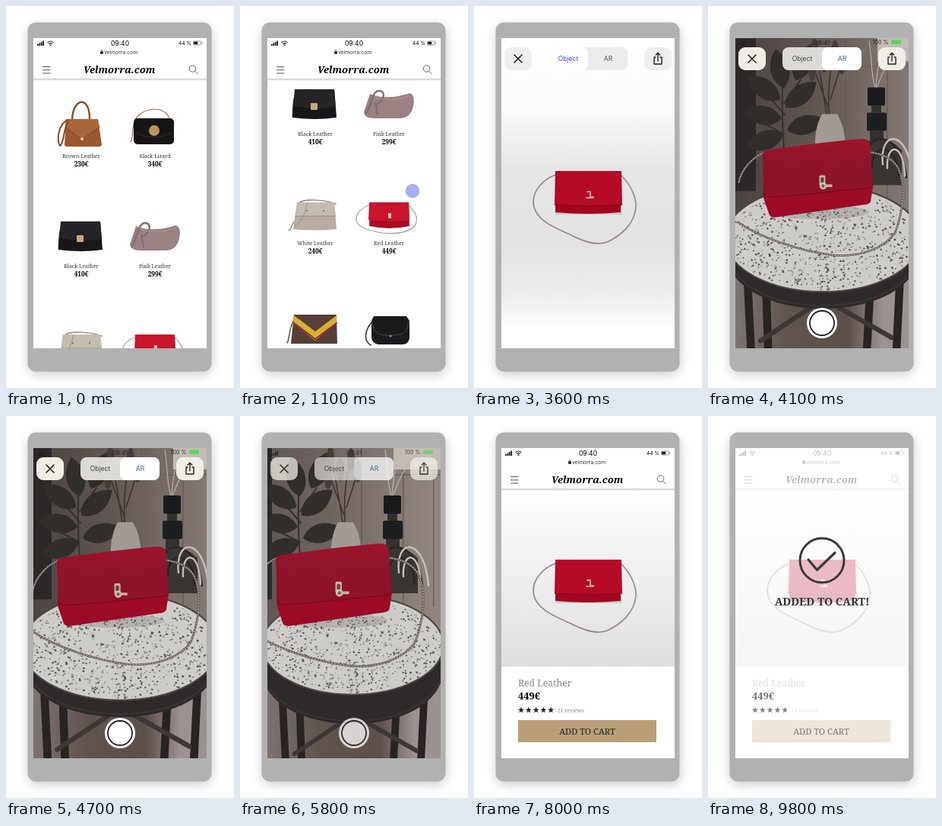
An HTML page that plays this animation: 300x500 px, repeating every 9900 ms.

```html
<!DOCTYPE html>
<html lang="en">
<head>
<meta charset="utf-8">
<title>Bag shop with AR preview</title>
<style>
  html, body { margin: 0; width: 100%; height: 100%; overflow: hidden; background: #fff; }
  svg { display: block; width: 300px; height: 500px; }
  text { font-family: "Noto Serif", serif; }
  .ui { font-family: Inter, "Liberation Sans", sans-serif; }
  .mid { text-anchor: middle; }
  .line { fill: none; stroke-linecap: round; stroke-linejoin: round; }
</style>
</head>
<body>
<svg id="stage" viewBox="0 0 300 500"></svg>
<script>
const LOOP = 9900, STEP = 100, ROW = 143.5, SCROLL = 173;
const stage = document.getElementById('stage');

const text = (x, y, size, str, cls = 'mid', extra = '') =>
  `<text x="${x}" y="${y}" font-size="${size}" class="${cls}" ${extra}>${str}</text>`;
const shape = (d, fill) => `<path d="${d}" fill="${fill}"/>`;
const line = (d, color, width = 1) =>
  `<path class="line" d="${d}" stroke="${color}" stroke-width="${width}"/>`;
const box = (x, y, w, h, fill, r = 0) =>
  `<rect x="${x}" y="${y}" width="${w}" height="${h}" rx="${r}" fill="${fill}"/>`;
const disc = (x, y, r, fill) => `<circle cx="${x}" cy="${y}" r="${r}" fill="${fill}"/>`;
const group = (id, body, extra = '') => `<g id="${id}" ${extra}>${body}</g>`;

function random(seed) {
  return () => (seed = (seed * 16807) % 2147483647) / 2147483647;
}

// ---- shop list ----
const bags = [
  ['Brown Leather', '230€',
    line('M87 149C88 119 111 117 110 149', '#8a4d29', 2.4) +
    shape('M79 148H121L126 181Q126 184 122 184H80Q77 184 77 181Z', '#9b5931') +
    shape('M79 148H121L123 158L100 175L78 158Z', '#a9663b') +
    line('M78 158L100 175L123 158', '#6f3c20', .8) +
    line('M82 149C69 153 66 177 71 183C77 179 75 160 82 152', '#83492a', 2) +
    disc(100, 174, 2, '#e4cfae')],
  ['Black Lizard', '340€',
    line('M169 152C173 134 211 126 216 150M169 152C165 162 168 172 164 178', '#98764c', 1.2) +
    box(168, 147, 53, 34, '#171516', 5) +
    line('M171 166Q195 178 218 166', '#353033', 1) + disc(195, 163, 7, '#b9945c')],
  ['Black Leather', '410€',
    line('M73 301C77 288 82 283 87 283M70 318C70 303 72 287 77 283', '#34312e', 2.5) +
    shape('M72 282H124L127 319Q99 323 69 319Z', '#171719') +
    shape('M72 282H124L126 305Q98 310 72 304Z', '#252528') + box(93, 300, 9, 9, '#c6a878', 1)],
  ['Pink Leather', '299€',
    shape('M171 288Q192 297 224 287Q231 291 228 304Q225 319 211 320H176Q164 320 163 312Z', '#9b8182') +
    line('M166 314C174 300 174 283 184 284C194 286 187 300 178 302M178 300L181 315', '#7f7072', 2.4) +
    line('M176 292Q197 300 222 291', '#b49b9b', .8)],
  ['White Leather', '240€',
    line('M74 453C66 459 68 467 64 466M76 432C83 423 117 428 126 432', '#8f8579', 1.5) +
    shape('M75 430H124L127 465Q99 468 70 465Z', '#b7aea1') +
    shape('M75 430H124L126 448H73Z', '#c4bcae') +
    line('M73 448H126M72 460C82 458 86 441 89 430', '#8f8579', .8) +
    disc(88, 441, 1, '#6b6259') + disc(110, 441, 1, '#6b6259')],
  ['Red Leather', '449€',
    line('M171 433C151 441 146 456 164 464C190 474 221 473 231 459C236 447 226 438 222 434', '#a8a3a0', 1.3) +
    shape('M171 431H222L223 461Q197 467 170 461Z', '#a70f24') +
    shape('M170 430H222L223 453Q197 457 169 453Z', '#c9152d') + box(195, 444, 4, 7, '#d2c6bd', 1)],
  ['Brown Stripe', '380€',
    line('M70 585C64 599 65 610 62 614', '#5b4235', 1.4) +
    shape('M71 577H127L128 615H67Z', '#573e36') +
    shape('M71 578L99 599L127 578V588L99 611L70 588Z', '#d5ae36') +
    line('M71 588L99 609L127 588', '#8c2d2c', 2)],
  ['Black Saddle', '320€',
    line('M174 586C162 600 164 612 172 617', '#2c2c2e', 1.5) +
    shape('M176 579H219L223 585V608Q221 616 214 616H182Q173 614 173 606V585Z', '#1b1b1d') +
    line('M174 585C175 602 182 604 197 604C214 604 221 602 222 585', '#49484b', 1) +
    disc(198, 605, 1.5, '#8f8b87')]
];
const list = bags.map(([name, price, art], i) => {
  const x = i % 2 ? 196 : 99, y = 199 + (i >> 1) * ROW;
  return art + text(x, y, 6.9, name, 'mid', 'fill="#333"') +
    text(x, y + 11, 8.4, price, 'mid', 'font-weight="700"');
}).join('');

// ---- shared parts ----
const signal = color => [0, 1, 2, 3].map(i => box(41 + i * 2.4, 50 - i * 1.5, 1.8, 2 + i * 1.5, color)).join('');
const header = box(36, 42, 228, 54, '#fff') + signal('#222') +
  line('M55 47.5Q58.5 44.5 62 47.5M56.6 49.4Q58.5 47.8 60.4 49.4', '#222', 1.2) + disc(58.5, 51.2, 1, '#222') +
  text(150, 52, 8.6, '09:40', 'ui mid') + text(235.5, 51, 6.6, '44 %', 'ui mid') +
  '<rect x="246.5" y="46" width="10" height="5" rx="1" fill="none" stroke="#777" stroke-width=".7"/>' +
  box(247.2, 46.7, 5, 3.6, '#222') + box(257.3, 47.5, 1, 2, '#777') +
  box(124, 59.5, 4, 3.2, '#222', .6) + line('M125 59.5V58.3Q126 56.8 127 58.3V59.5', '#222', .7) +
  text(151, 62.5, 6.8, 'velmorra.com', 'ui mid', 'fill="#333"') +
  line('M48.5 79.5H58M48.5 83.8H58M48.5 88H58', '#555', 1) +
  text(149, 88, 13, 'Velmorra.com', 'mid', 'font-weight="800" font-style="italic"') +
  '<circle cx="245.5" cy="82" r="4.3" fill="none" stroke="#666"/>' + line('M248.8 85.4L252.4 89', '#666', 1) +
  box(36, 95.3, 228, 1.2, '#b9b9b9') + box(36, 96.5, 228, 1.5, '#eee');

const redBag = line('M107 221C91 227 78 241 78 257C79 279 103 289 126 299C145 309 161 314 175 309C195 300 211 284 213 264C214 249 205 233 194 222', '#968b86', 1.7) +
  box(107, 268, 88, 5, '#777', 2).replace('/>', ' opacity=".25"/>') +
  shape('M107 240H194L193 270Q150 274 107 270Z', '#a30520') +
  shape('M107 216H194L195 260Q151 264 106 260Z', '#b50928') +
  line('M106 260Q151 264 195 260', '#78061b', 1.1) +
  line('M149 243H153V250H157M148 251H157', '#b9a49a', 2.2);

const star = x => {
  let d = '';
  for (let i = 0; i < 10; i++) {
    const a = i * Math.PI / 5, r = i % 2 ? 1.8 : 4.3;
    d += `${i ? 'L' : 'M'}${(x + r * Math.sin(a)).toFixed(1)} ${(385 - r * Math.cos(a)).toFixed(1)}`;
  }
  return shape(d + 'Z', '#222');
};
const product = box(36, 96, 228, 352, '#fff') + box(36, 97, 228, 231, 'url(#studio)') +
  group('', redBag, 'transform="translate(0 -28)"') +
  text(58, 354, 12.2, 'Red Leather', '', 'fill="#888"') +
  text(110, 388, 6.8, '21 reviews', '', 'fill="#888"') + box(58, 398, 182, 29, '#b99f78');
const details = text(58, 371, 13, '449€', '', 'font-weight="700"') +
  [62, 71.8, 81.6, 91.4, 101.2].map(star).join('') +
  text(149, 417, 11.2, 'ADD TO CART', 'mid', 'fill="#222"');

// ---- viewer toolbar ----
const toolbar = ar => {
  const idle = ar ? '#dcdad7' : '#ebebeb', key = ar ? '#efede6' : '#eee';
  return box(40, 54, 36, 30, key, 9) + line('M53 64L63 74M63 64L53 74', '#222', 1.6) +
    box(98, 54, 104, 30, idle, 8) + box(ar ? 150 : 98, 54, 52, 30, '#fff', 8) +
    text(124, 72, 8.6, 'Object', 'ui mid', `fill="${ar ? '#444' : '#3942dc'}"`) +
    text(176.5, 72, 8.6, 'AR', 'ui mid', `fill="${ar ? '#2f6398' : '#555'}"`) +
    box(224, 54, 36, 30, key, 9) +
    line('M239 67H237V76H247V67H245M242 72V61.5M239.3 64L242 61.3L244.7 64', '#222', 1.4);
};
const viewer = box(36, 42, 228, 406, 'url(#floor)') + redBag + toolbar(false);

// ---- camera scene ----
const leaf = (x, y, a, s = 1.25) =>
  `<path d="M0 0C-13 -10 -12 -29 2 -42C15 -27 13 -9 0 0" fill="#302d2b" transform="translate(${x} ${y}) rotate(${a}) scale(${s})"/>`;
const backdrop = box(0, 0, 340, 320, 'url(#wall)') +
  group('light', box(0, 0, 340, 320, '#d8cdc8')) +
  [177, 232, 272].map(x => box(x, 0, 1.5, 250, '#665d59')).join('') +
  box(180, 76, 160, 1.5, '#69605c') + box(220, 30, 80, 40, '#c3bbb6') +
  box(10, 40, 50, 200, '#2b2827') +
  line('M97 185C94 150 94 110 97 65M98 140L72 110M97 125L119 94M97 165L67 150', '#35312e', 2) +
  [[97, 105, -15], [92, 120, -58], [99, 130, 48], [94, 145, -82], [96, 165, -112], [101, 160, 72], [112, 95, 22]].map(p => leaf(...p)).join('') +
  line('M155 150C148 110 144 80 137 46M157 148C153 105 158 80 165 48M155 130L134 73M158 120L175 66', '#3d3430', 1.6) +
  [[137, 55], [150, 70], [164, 57], [134, 81], [173, 72]].map(([x, y]) =>
    `<ellipse cx="${x}" cy="${y}" rx="5" ry="15" fill="#463c38"/>`).join('') +
  shape('M147 139H167Q179 160 178 190H138Q136 158 147 139Z', '#a29a95') +
  line('M217 105C211 85 213 67 209 44M218 105C219 78 225 62 227 46M219 105C230 75 238 63 247 56', '#beb3ad', 1.1) +
  box(207, 104, 23, 24, '#191a1c', 2) + box(212, 128, 13, 9, '#30302f') + box(206, 137, 26, 24, '#1d1e20', 2) +
  box(210, 161, 18, 30, '#343231') +
  shape('M203 176Q232 165 252 186V232H203Z', '#3a3533') +
  [0, 1].map(i => line(`M${205 + i * 22} 205C${200 + i * 22} 158 ${251 + i * 10} 158 ${258 + i * 8} 222M${213 + i * 20} 210C${211 + i * 20} 177 ${246 + i * 8} 174 ${248 + i * 8} 220`, i ? '#c5bfbb' : '#292524', 2.4)).join('');

const rnd = random(77);
let dark = '', pale = '';
for (let i = 0; i < 900; i++) {
  const a = rnd() * 6.283, r = Math.sqrt(rnd()) * .97, s = .7 + rnd() * 1.4;
  const x = 150 + 121 * r * Math.cos(a), y = 293 + 65 * r * Math.sin(a);
  const d = `M${x.toFixed(1)} ${y.toFixed(1)}l${s.toFixed(1)} ${(-s * rnd()).toFixed(1)} ${(s * .7).toFixed(1)} ${s.toFixed(1)} ${(-s * 1.3).toFixed(1)} ${(s * .4).toFixed(1)}z`;
  if (i % 3) dark += d; else pale += d;
}
const base = line('M55 345L61 465M79 372L83 485M209 373L203 485M247 345L240 485', '#272423', 10) +
  line('M72 438L151 386L236 434', '#3d3735', 6) +
  shape('M28 293V327C31 373 88 398 150 398S269 373 272 327V293Z', '#2d2a29') +
  line('M29 328C37 372 91 394 150 394S263 372 271 328', '#3b3634', 1.5);
const table = group('base', base) +
  '<ellipse cx="150" cy="293" rx="122" ry="66" fill="#ceccc8" stroke="#494542" stroke-width="2"/>' +
  shape(dark, '#555353') + shape(pale, '#969290');

// Drawn from the bag's own upper left corner.
const chain = 'M2 18C-14 25 -27 41 -30 56M-30 109C-2 128 50 146 93 151C129 154 160 142 174 122C184 95 189 60 178 38C170 23 153 19 140 17';
const arBag = '<ellipse cx="74" cy="95" rx="66" ry="9" fill="#44393a" opacity=".18"/>' +
  line(chain, '#5d5653', 2.6) + line(chain, '#b5aca5', 1.2).replace('/>', ' stroke-dasharray="1.4 2.2"/>') +
  shape('M2 22Q0 17 7 15L131 0Q139 0 141 6L145 62L142 81Q141 84 136 85L17 102Q10 102 9 96L2 76Z', '#9c0a26') +
  shape('M1 21Q0 16 9 14C45 9 90 3 130 0Q139 0 141 6L145 58Q143 64 136 64C94 67 53 74 12 75Q4 76 3 68Z', 'url(#flap)') +
  line('M4 71Q5 76 13 75C53 74 94 67 136 64Q143 64 145 59', '#74091d', 1.2) +
  box(75, 47, 8, 14, '#c3b3a5', 2) + box(77, 50, 4, 7, '#5e423a', 1) +
  disc(80, 61, 4.6, '#cfc2b6') + disc(80, 61, 2.2, '#7d6257') + box(82, 59, 10, 3.5, '#c3b3a5', 1);

const camera = box(36, 42, 228, 406, 'url(#ground)') + group('back', backdrop) +
  group('table', table) + group('arBag', arBag) +
  group('arUi', signal('#222') + text(150, 51, 8, '09:41', 'ui mid', 'fill="#222"') +
    text(227, 50, 7, '100 %', 'ui mid', 'fill="#222"') + box(241, 44.5, 13, 5.5, '#56d75b', 1.5) +
    toolbar(true) + disc(150, 415, 20, '#fff') +
    '<circle cx="150" cy="415" r="16" fill="#fff" stroke="#222" stroke-width="1.8"/>');

const done = '<circle cx="150" cy="189" r="29" fill="none" stroke="#3b3b3b" stroke-width="3"/>' +
  line('M132 188L143.5 201.5L167 179', '#3b3b3b', 3.2) +
  text(150, 248, 14.2, 'ADDED TO CART!', 'mid', 'font-weight="700" fill="#333"');

const gradient = (id, x2, y2, ...list) => `<linearGradient id="${id}" x2="${x2}" y2="${y2}">` +
  list.map(([o, c]) => `<stop offset="${o}" stop-color="${c}"/>`).join('') + '</linearGradient>';

stage.innerHTML = `<defs>
  ${gradient('studio', 0, 1, [0, '#fff'], [.35, '#f3f3f3'], [1, '#dedede'])}
  ${gradient('floor', 0, 1, [0, '#fff'], [.22, '#fbfbfb'], [.42, '#e6e6e6'], [.65, '#e2e2e2'], [.82, '#ebebeb'], [.94, '#fff'])}
  ${gradient('wall', 1, 0, [.1, '#4c4441'], [.4, '#5f5551'], [.62, '#776c67'], [.8, '#857a75'])}
  ${gradient('ground', 1, 0, [0, '#7d7471'], [.3, '#60544f'], [.65, '#5c504c'], [.85, '#9b9190'])}
  ${gradient('flap', 0, 1, [0, '#a0132b'], [.3, '#90142a'], [1, '#8e1229'])}
  <clipPath id="screen"><rect x="36" y="42" width="228" height="406"/></clipPath>
  <filter id="soft" x="-20%" y="-20%" width="140%" height="140%"><feGaussianBlur stdDeviation="7"/></filter>
  </defs>` +
  '<rect x="28" y="25" width="244" height="458" rx="14" opacity=".18" filter="url(#soft)"/>' +
  box(28.5, 21.5, 242, 457, '#b1b1b1', 11) +
  group('', box(36, 42, 228, 406, '#fff') + group('list', list) + group('product', product) + header +
    group('veil', box(36, 42, 228, 406, '#fff')) + group('details', details) +
    group('viewer', viewer) + group('camera', camera) + group('done', done) +
    '<circle id="dot" fill="#485de5"/>', 'clip-path="url(#screen)"');

// ---- motion ----
const el = id => document.getElementById(id);
const clamp = v => Math.max(0, Math.min(1, v));
const ramp = (t, a, b) => clamp((t - a) / (b - a));
const ease = p => p * p * (3 - 2 * p);
const move = (id, value) => el(id).setAttribute('transform', value);
const fade = (id, v) => {
  el(id).style.opacity = v;
  el(id).style.display = v > 0 ? '' : 'none';
};

// Each row: time, then values.
function pose(t, rows) {
  let i = 0;
  while (i < rows.length - 2 && t > rows[i + 1][0]) i++;
  const [a, b] = [rows[i], rows[i + 1]], p = ramp(t, a[0], b[0]);
  return a.slice(1).map((v, k) => v + (b[k + 1] - v) * p);
}
// Bag: x, y, scale. Table: x, y, scale, base offset. Backdrop: x, y, glow.
const bagPath = [[3700, 74, 176, 1], [4700, 66, 171, 1.02], [5800, 46, 167, 1.06], [6700, 53, 140, 1.12], [7800, 57, 134, 1.14]];
const tablePath = [[3700, 152, 306, 1.05, -18], [4700, 150, 302, 1.06, -18], [5800, 148, 300, .98, 0], [6700, 150, 283, 1, 0], [7800, 152, 279, 1.02, 0]];
const backPath = [[3700, 5, 4, 0], [4700, 0, 0, 0], [5800, -18, 0, .12], [6700, -22, -20, .08], [7800, -19, -24, .08]];

// Touches: start, end, from x y, to x y.
const touches = [
  [100, 1200, 227, 415, 227, 242],
  [1450, 1850, 203, 272, 203, 272],
  [2350, 2750, 150, 220, 150, 220],
  [3400, 3800, 177, 69, 177, 69],
  [8400, 8900, 150, 412, 150, 412]
];

function draw(t) {
  move('list', `translate(0 ${-SCROLL * ease(ramp(t, 300, 1000))})`);
  const opened = ramp(t, 1800, 2100), bought = ramp(t, 9000, 9400);
  fade('list', 1 - opened);
  fade('product', opened);
  fade('details', opened * (1 - .45 * bought));
  fade('veil', .73 * bought);
  fade('done', bought);
  fade('viewer', t < 4000 ? ramp(t, 2600, 2900) : 0);
  fade('camera', ramp(t, 3700, 4000) - ramp(t, 7500, 7900));
  fade('arUi', 1 - ramp(t, 5650, 6250));

  const [bx, by, bs] = pose(t, bagPath);
  const [tx, ty, ts, drop] = pose(t, tablePath);
  const [wx, wy, glow] = pose(t, backPath);
  move('arBag', `translate(${bx} ${by}) scale(${bs})`);
  move('table', `translate(${tx} ${ty}) scale(${ts}) translate(-150 -293)`);
  move('base', `translate(0 ${drop})`);
  move('back', `translate(${wx} ${wy})`);
  fade('light', glow);

  const touch = touches.find(([a, b]) => t > a && t < b);
  fade('dot', 0);
  if (touch) {
    const [a, b, x0, y0, x1, y1] = touch;
    const p = clamp(Math.min(t - a, b - t) / 200);
    const q = ease(ramp(t, a + 200, b - 200));
    const dot = el('dot');
    dot.setAttribute('cx', x0 + (x1 - x0) * q);
    dot.setAttribute('cy', y0 + (y1 - y0) * q);
    dot.setAttribute('r', 18.5 * p);
    fade('dot', .12 + .73 * p);
  }
}

const begin = performance.now();
function tick() {
  const t = (performance.now() - begin) % LOOP;
  draw(Math.floor(t / STEP) * STEP);
  requestAnimationFrame(tick);
}
tick();
</script>
</body>
</html>
```
